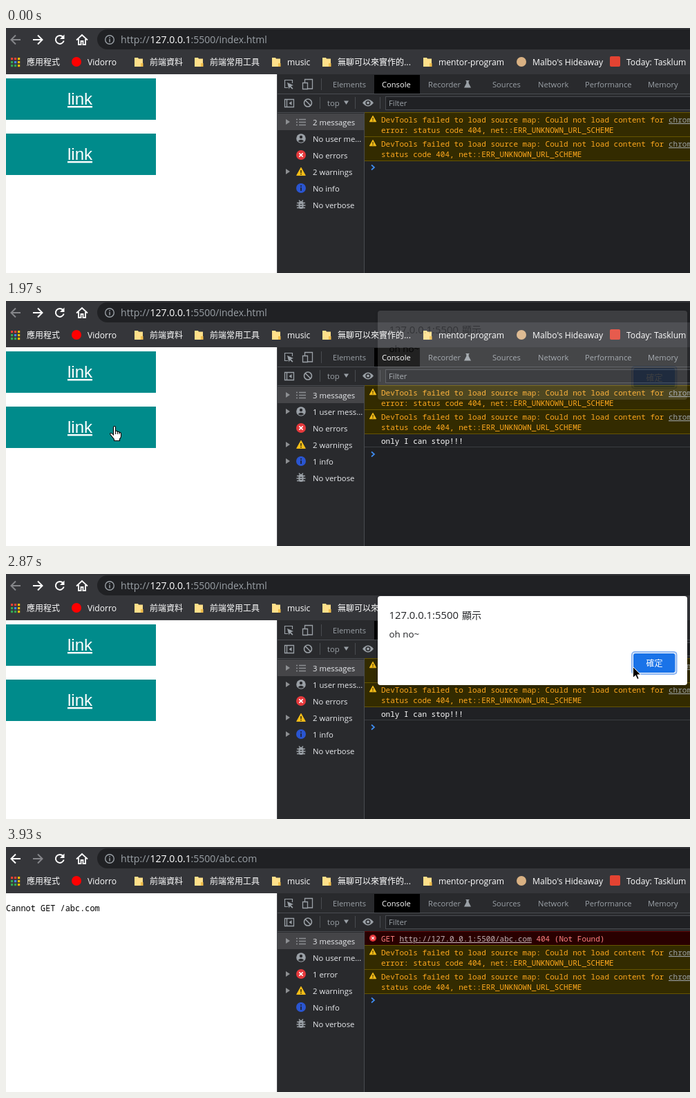
An HTML page for the animation above (4600 ms loop, 990 by 355 pixels).

```html
<!DOCTYPE html>
<html lang="zh-Hant">
<head>
<meta charset="utf-8">
<title>preventDefault demo</title>
<style>
  html, body { margin: 0; width: 100%; height: 100%; overflow: hidden; background: #fff; }
  svg { display: block; width: 990px; height: 355px; }
  text { white-space: pre; }
  .ui { font-family: "Open Sans", "Noto Sans CJK TC", "Noto Sans CJK", sans-serif; }
  .cjk { font-family: "Noto Sans CJK TC", "Noto Sans CJK", sans-serif; }
  .mono { font-family: "Noto Sans Mono", "DejaVu Sans Mono", monospace; font-weight: 500; }
  .arial { font-family: "Liberation Sans", Arial, sans-serif; }
  .u { text-decoration: underline; }
  #dialog { filter: drop-shadow(0 1px 3px rgba(0, 0, 0, .3)); }
</style>
</head>
<body>
<svg id="stage" viewBox="0 0 990 355"></svg>
<script>
const LOOP = 4600;

// Markup helpers
const rect = (x, y, w, h, fill, more = '') =>
  `<rect x="${x}" y="${y}" width="${w}" height="${h}" fill="${fill}" ${more}/>`;
const circle = (x, y, r, fill, more = '') =>
  `<circle cx="${x}" cy="${y}" r="${r}" fill="${fill}" ${more}/>`;
const line = (d, color, width = 1, more = '') =>
  `<path d="${d}" fill="none" stroke="${color}" stroke-width="${width}" ${more}/>`;
const shape = (d, fill, more = '') => `<path d="${d}" fill="${fill}" ${more}/>`;
const text = (x, y, str, size, fill, cls = 'ui') =>
  `<text x="${x}" y="${y}" font-size="${size}" fill="${fill}" class="${cls}">${str}</text>`;
const code = (x, y, str, fill, more = '') => text(x, y, str, 11, fill, 'mono ' + more);

const GREY = '#9aa0a6', WHITE = '#fff', PANEL = '#292a2d', RULE = '#494c50';
const AMBER = '#ffa91e', DIM = '#8d8f92';

function toolbar(moved) {
  const back = moved ? WHITE : '#85868a', forward = moved ? '#85868a' : WHITE;
  return rect(0, 0, 990, 67, '#35363a') +
    rect(132, 2, 900, 29, '#202124', 'rx="14.5"') +
    line('M21 17H8M14 10.5L7.5 17L14 23.5', back, 2) +
    line('M39 17H52M46 10.5L52.5 17L46 23.5', forward, 2) +
    line('M82.5 13A6 6 0 1 0 83.7 18.5', WHITE, 2) +
    shape('M84.5 9.5V16H78z', WHITE) +
    line('M102 17.5L110 10L118 17.5M105 16V24H108.5V19H111.5V24H115V16', WHITE, 1.8) +
    circle(150, 17, 6.3, 'none', `stroke="${GREY}" stroke-width="1.4"`) +
    rect(149.3, 16, 1.5, 4.5, GREY) + rect(149.3, 13.3, 1.5, 1.6, GREY) +
    text(166, 22, 'http://', 14.2, GREY) +
    text(208.5, 22, '127.0.0.1', 14, WHITE) +
    text(267.5, 22, ':5500' + (moved ? '/abc.com' : '/index.html'), 14, GREY) +
    bookmarks();
}

function bookmarks() {
  const dots = ['#ea4335', '#ea4335', '#fbbc04', '#34a853', '#4285f4', '#fbbc04', '#34a853', '#34a853', '#fbbc04'];
  const label = (x, str) => text(x, 54, str, 12.15, WHITE);
  const han = (x, str) => text(x, 54, str, 12, WHITE, 'cjk');
  const folder = x => shape(`M${x} 43h5l1 1.5h6v11.5h-12z`, '#ffe08a') +
    shape(`M${x + 9} 51h3.5v5h-3.5z`, '#f0bd4c');
  const inFolder = (put, x, str) => folder(x - 22) + put(x, str);
  return dots.map((c, i) => rect(7 + i % 3 * 5, 43 + Math.floor(i / 3) * 5, 3.2, 3.2, c)).join('') +
    han(30, '應用程式') +
    circle(102, 49, 7, '#f00') + label(118, 'Vidorro') +
    inFolder(han, 208, '前端資料') +
    inFolder(han, 295, '前端常用工具') +
    inFolder(label, 407, 'music') +
    inFolder(han, 480, '無聊可以來實作的...') +
    inFolder(label, 626, 'mentor-program') +
    circle(746, 49, 7, '#d9b183') + label(762, "Malbo's Hideaway") +
    rect(874, 41, 15, 15, '#e44332', 'rx="2"') + label(898, 'Today: Tasklum');
}

function page(moved) {
  const link = y => rect(0, y, 217, 60, '#008b8b') + text(89, y + 38, 'link', 24, WHITE, 'arial u');
  return rect(0, 67, 392, 288, WHITE) +
    (moved ? text(0, 93, 'Cannot GET /abc.com', 11.92, '#000', 'mono') : link(73) + link(153));
}

function devtools() {
  const tab = (x, str, fill = GREY) => text(x, 86, str, 11.15, fill);
  return rect(392, 67, 598, 288, '#202124') +
    rect(393, 67, 597, 55, PANEL) + rect(392, 67, 1, 288, RULE) +
    rect(533, 68, 66, 27, '#000') +
    rect(393, 95, 597, 1, RULE) + rect(393, 122, 597, 1, RULE) +
    line('M408 86.5H403.5V75.5H414.5V80', GREY, 1.2) +
    shape('M407 79L416 83L412.3 84.3L415.5 87.5L414.3 88.7L411 85.5L409.5 88.5z', GREY) +
    line('M432.5 79V74.5H443.5V88H437M429.5 79.5H436.5V88.5H429.5z', GREY, 1.3) +
    rect(456, 73, 1, 17, RULE) +
    tab(473, 'Elements') + tab(544, 'Console', WHITE) + tab(611, 'Recorder') +
    shape('M665.5 76H670.5V77H669.7V80L673 86.5H663L666.3 80V77H665.5z', GREY) +
    tab(704, 'Sources') + tab(770, 'Network') + tab(838, 'Performance') + tab(929, 'Memory') +
    line('M403.5 103.5H416.5V114.5H403.5zM406.5 103.5V114.5', GREY, 1.3) +
    shape('M413.5 106V112L409.5 109z', GREY) +
    circle(437, 108.5, 5.5, 'none', `stroke="${GREY}" stroke-width="1.6"`) +
    line('M433.2 104.7L440.8 112.3', GREY, 1.6) +
    rect(454, 100, 1, 17, RULE) + text(465, 113, 'top', 11.3, GREY) +
    shape('M489 105.5H496L492.5 111z', GREY) + rect(505, 100, 1, 17, RULE) +
    shape('M516 108.5Q524 98.5 532 108.5Q524 118.5 516 108.5z', GREY) +
    circle(524, 108.5, 3.6, PANEL) + circle(524, 108.5, 2, GREY) +
    rect(541, 100, 1, 17, RULE) +
    rect(549.5, 99.5, 450, 19, '#202124', `stroke="${RULE}"`) +
    text(554, 113, 'Filter', 11.3, GREY);
}

const cross = (x, y, r) => circle(x, y, r, '#e5393c') +
  line(`M${x - r * .38} ${y - r * .38}l${r * .76} ${r * .76}m0 ${-r * .76}l${-r * .76} ${r * .76}`, WHITE, r * .22);
const warning = (x, y, r) =>
  shape(`M${x} ${y - r}L${x + r} ${y + r * .8}H${x - r}z`, '#f5bd18', 'stroke="#f5bd18" stroke-linejoin="round"') +
  rect(x - r * .12, y - r * .4, r * .24, r * .65, '#30290a') +
  rect(x - r * .12, y + r * .4, r * .24, r * .24, '#30290a');

function sidebar(logged, moved) {
  const rows = [
    [logged || moved ? '3 messages' : '2 messages', true],
    [logged ? '1 user mess...' : 'No user me...', logged],
    [moved ? '1 error' : 'No errors', moved],
    ['2 warnings', true],
    [logged ? '1 info' : 'No info', logged],
    ['No verbose', false]
  ];
  const icons =
    line('M424 132.5h10M424 136.5h10M424 140.5h10M420 132.5h2M420 136.5h2M420 140.5h2', DIM, 1.5) +
    circle(427, 160, 6.8, GREY) + circle(427, 158, 2.2, PANEL) +
    shape('M422.7 164Q427 159.5 431.3 164Q427 167.5 422.7 164z', PANEL) +
    cross(427, 184, 7) + warning(427, 208.5, 6.3) +
    circle(427, 232, 7, '#2a55d0') + rect(426.2, 231, 1.7, 5, '#1c2030') + rect(426.2, 228, 1.7, 1.8, '#1c2030') +
    rect(423.5, 251, 7, 11, GREY, 'rx="3.3"') +
    line('M421 253.5h12M420.5 257h13M421 260.5h12M424 249.5l2 2M430 249.5l-2 2', GREY, 1.4) +
    line('M425.5 255.5h3M425.5 258.5h3', PANEL, 1.1);
  return rect(393, 123, 125, 232, PANEL) + rect(393, 124, 125, 24, '#454548') +
    rect(518, 123, 1, 232, RULE) + icons +
    rows.map(([str, open], i) => {
      const y = 136 + i * 24;
      return text(444, y + 4.5, str, 11.3, '#e8eaed') +
        (open ? shape(`M405 ${y - 4}L411 ${y}L405 ${y + 4}z`, DIM) : '');
    }).join('');
}

function messages(logged, moved) {
  const row = (y, h, fill, border) =>
    rect(519, y - 1, 471, h + 2, border) + rect(519, y, 471, h, fill);
  const warn = (y, detail) =>
    row(y, 34, '#332b00', '#665500') + warning(531, y + 9, 4.7) +
    code(543, y + 14, 'DevTools failed to load source map: Could not load content for ', AMBER) +
    code(959, y + 14, 'chrome://', GREY, 'u') +
    code(543, y + 28.5, detail + 'status code 404, net::ERR_UNKNOWN_URL_SCHEME', AMBER);
  const top = moved ? 143 : 123, end = moved || logged ? 222 : 202;
  const error = row(123, 19, '#290000', '#5c0000') +
    cross(531, 132, 5) + code(543, 137, 'GET ', '#ff8080') +
    code(569.4, 137, 'http://127.0.0.1:5500/abc.com', '#c5b3b6', 'u') +
    code(767.4, 137, '404 (Not Found)', '#ff8080');
  const log = code(543, 207, 'only I can stop!!!', WHITE) + rect(519, 211, 471, 1, '#3b3d41');
  return (moved ? error : '') + warn(top, 'error: ') + warn(top + 35, '') + (logged ? log : '') +
    line(`M529 ${end - 3.5}l4 3.5l-4 3.5`, '#3f8cf0', 1.7);
}

const dialog =
  rect(538, 32, 448, 129, WHITE, 'rx="4"') +
  text(554.5, 65, '127.0.0.1:5500', 14.8, '#202124') +
  text(660, 65, '顯示', 14, '#202124', 'cjk') +
  text(554.5, 92, 'oh no~', 13.4, '#202124') +
  rect(907, 113, 64, 32, '#1a73e8', 'rx="3"') +
  '<g id="focus">' + rect(906, 113, 64.5, 32, WHITE, 'rx="4" stroke="#8ab4f2" stroke-width="2"') +
  rect(908, 115, 60.5, 28, '#1a73e8', 'rx="3"') + '</g>' +
  text(926.5, 134, '確定', 12, WHITE, 'cjk');

const arrow = shape('M.5 .5V16.5L4.2 13L6.7 18.6L9.2 17.5L6.8 12H11.7z', '#000', 'stroke="#fff"');
const hand = '<g transform="translate(-6)">' +
  shape('M5.5 13V2A1.5 1.5 0 0 1 8.5 2V7.5Q11.3 6.7 11.3 8.5Q14 7.8 14 9.5Q16.5 9 16.5 11.5V15Q16.5 17 14.5 19V21.5H6.5V19.5L1 12.5Q0 10.5 2 10.5Q3.5 10.5 5.5 13z', WHITE, 'stroke="#000" stroke-width="1.1"') +
  line('M8.5 7.5V12M11.3 8.5V12M14 9.5V12', '#000') + '</g>';

// Motion
const clamp = v => Math.min(1, Math.max(0, v));
const smooth = p => p * p * (3 - 2 * p);
const easeIn = p => p * p;
const cubicIn = p => p ** 3;
const cubicOut = p => 1 - (1 - p) ** 3;

// start, end, target x, target y, easing
const moves = [
  [50, 490, 156, 91, smooth],
  [1445, 1690, 156, 181, smooth],
  [2190, 2370, 393, 195, cubicIn],
  [2370, 2870, 907, 134, cubicOut],
  [3000, 3310, 928, 134, smooth],
  [3590, 3930, 975, 360, easeIn]
];
const clicks = [[620, 720], [1870, 1960], [2970, 3060]];
const CLOSE = 3222, LOADED = 3230;

function pointer(t) {
  let x = 868, y = 342;
  for (const [from, to, tx, ty, ease] of moves) {
    const p = ease(clamp((t - from) / (to - from)));
    x += (tx - x) * p;
    y += (ty - y) * p;
  }
  return [Math.round(x), Math.round(y)];
}

const stage = document.getElementById('stage');
stage.innerHTML = `<g id="scene"></g><g id="dialog">${dialog}</g>
  <g id="pointer">${circle(0, 0, 15, '#ff0', 'id="press" opacity=".47"')}
  <g id="arrow">${arrow}</g><g id="hand">${hand}</g></g>`;
const [scene, box, focusRing, cursor, press, arrowEl, handEl] =
  ['scene', 'dialog', 'focus', 'pointer', 'press', 'arrow', 'hand'].map(id => document.getElementById(id));
const show = (el, on) => el.setAttribute('display', on ? 'inline' : 'none');

let state = '';
function draw(t) {
  const moved = t >= LOADED, logged = t >= 750 && !moved;
  const next = `${moved} ${logged}`;
  if (next !== state) {
    state = next;
    scene.innerHTML = toolbar(moved) + page(moved) + devtools() + sidebar(logged, moved) + messages(logged, moved);
  }

  const shown = clamp((t - 1952) / 145) * clamp(1 - (t - CLOSE) / 150);
  show(box, shown > 0);
  show(focusRing, t < CLOSE);
  box.setAttribute('opacity', shown);
  box.setAttribute('transform', `translate(0 ${Math.round(-21 * (1 - shown))})`);

  const [x, y] = pointer(t);
  const overLink = !moved && x < 217 && (y >= 73 && y < 133 || y >= 153 && y < 213);
  show(cursor, t >= 70 && t < 3930);
  show(press, clicks.some(([a, b]) => t >= a && t < b));
  show(handEl, overLink);
  show(arrowEl, !overLink);
  cursor.setAttribute('transform', `translate(${x} ${y})`);
}

const start = performance.now();
function tick() {
  draw((performance.now() - start) % LOOP);
  requestAnimationFrame(tick);
}
tick();
</script>
</body>
</html>
```
